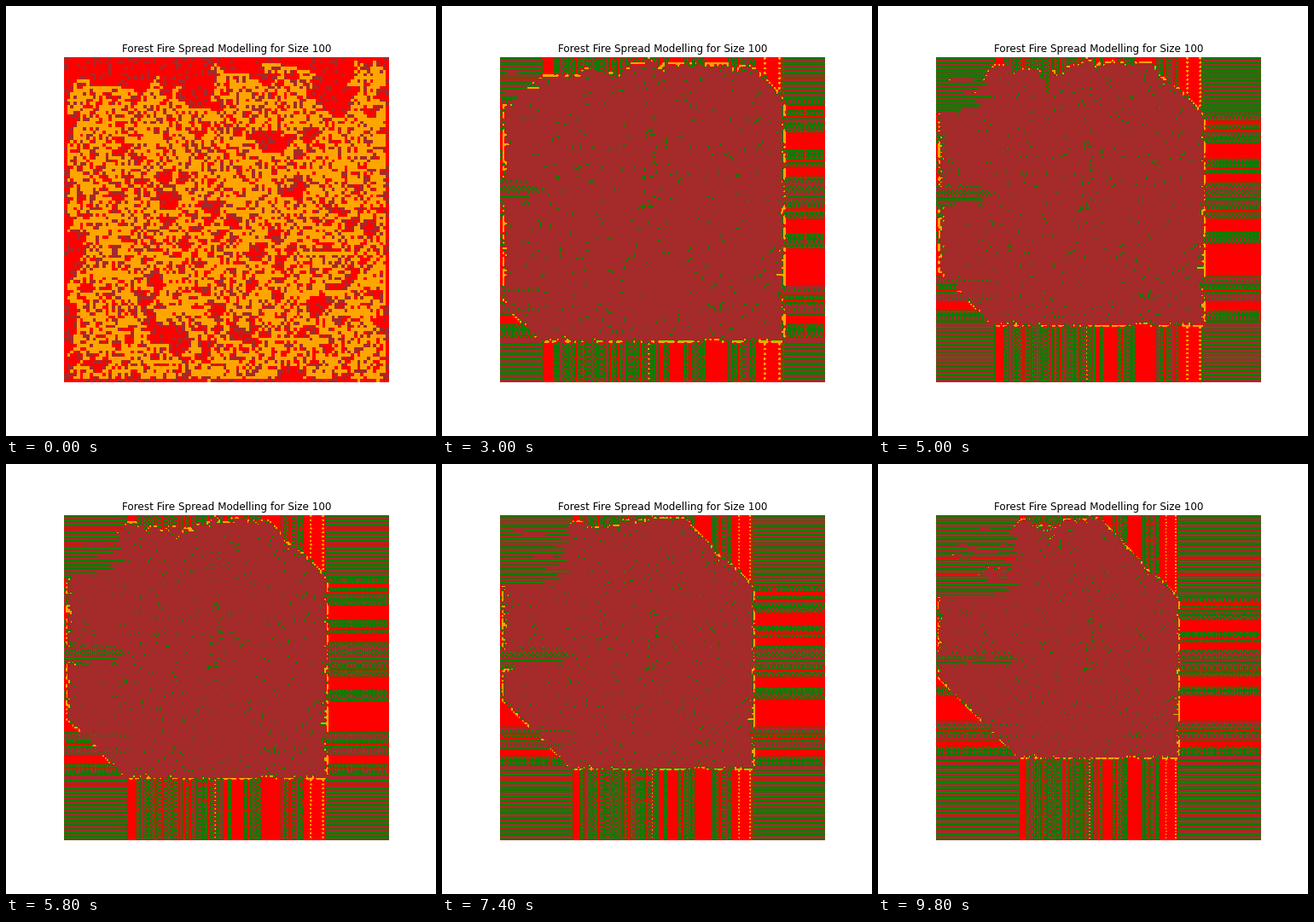
A matplotlib script that plays this animation: 504 by 504 pixels, repeating every 10000 ms.

```python
import numpy as np
import matplotlib.pyplot as plt
from matplotlib.animation import FuncAnimation
from matplotlib.colors import ListedColormap

EMPTY, TREE, BURNING = 0, 1, 2
SIZE, FRAMES = 100, 50
STAGE, DPI = 504, 72
P_TREE, P_BURN, P_LIGHTNING = 0.8, 0.75, 0.00075
rng = np.random.default_rng(11)

# First fires: row, column
SPARKS = [(0, 44), (0, 91), (0, 97), (2, 46), (2, 61), (2, 92), (7, 3), (6, 28)]
# Long wooded stretches on opposite borders
WOODED_COLS = [(1, 6), (52, 58), (67, 76), (87, 98)]
WOODED_ROWS = [(15, 21), (50, 54), (61, 74), (88, 93)]


def border_pair(stretches):
    pair = (rng.random((2, SIZE)) < 0.7).astype(float)
    for a, b in stretches:
        pair[:, a:b] = TREE
    return pair


def plant():
    forest = (rng.random((SIZE, SIZE)) < P_TREE).astype(float)
    forest[:, [0, -1]] = border_pair(WOODED_ROWS).T
    forest[[0, -1]] = border_pair(WOODED_COLS)
    forest[0, [0, -1]] = TREE
    forest[-1, [0, -1]] = EMPTY
    for spark in SPARKS:
        forest[spark] = BURNING
    return forest


def extend(grid):
    """Wrap the grid with one periodic ring of cells."""
    grid = np.vstack([grid[-1:], grid, grid[:1]])
    return np.hstack([grid[:, -1:], grid, grid[:, :1]])


def spread(grid):
    """Sweep the fixed window in place, so fire runs on along the scan."""
    luck = rng.random((SIZE + 1, SIZE + 1))
    for i in range(1, SIZE + 1):
        for j in range(1, SIZE + 1):
            if grid[i, j] == BURNING:
                grid[i, j] = EMPTY
            elif grid[i, j] == TREE and luck[i, j] < P_BURN:
                near = (grid[i - 1:i + 2, j - 1:j + 2] == BURNING).any()
                if near or luck[i, j] < P_LIGHTNING:
                    grid[i, j] = BURNING


def simulate():
    grid, states = plant(), []
    for _ in range(FRAMES):
        grid = extend(grid)
        spread(grid)
        states.append(grid)
    return states


states = simulate()

fig = plt.figure(figsize=(STAGE / DPI, STAGE / DPI), dpi=DPI, facecolor="white")
ax = fig.add_axes([0.135, 0.125, 0.755, 0.755])
ax.axis("off")
ax.set_title("Forest Fire Spread Modelling for Size 100", fontsize=12,
             family="DejaVu Sans", pad=6)
cmap = ListedColormap(["brown", "green", "red", "orange"])
# vmax just below 2 keeps full-strength trees safely in the third colour
image = ax.imshow(states[0], cmap=cmap, vmin=0, vmax=1.998, extent=(0, 1, 1, 0),
                  interpolation="antialiased", interpolation_stage="data")


def draw(frame):
    image.set_data(states[frame])
    return [image]


anim = FuncAnimation(fig, draw, frames=FRAMES, interval=200, repeat=True,
                     repeat_delay=0, blit=False)
plt.show()
```
